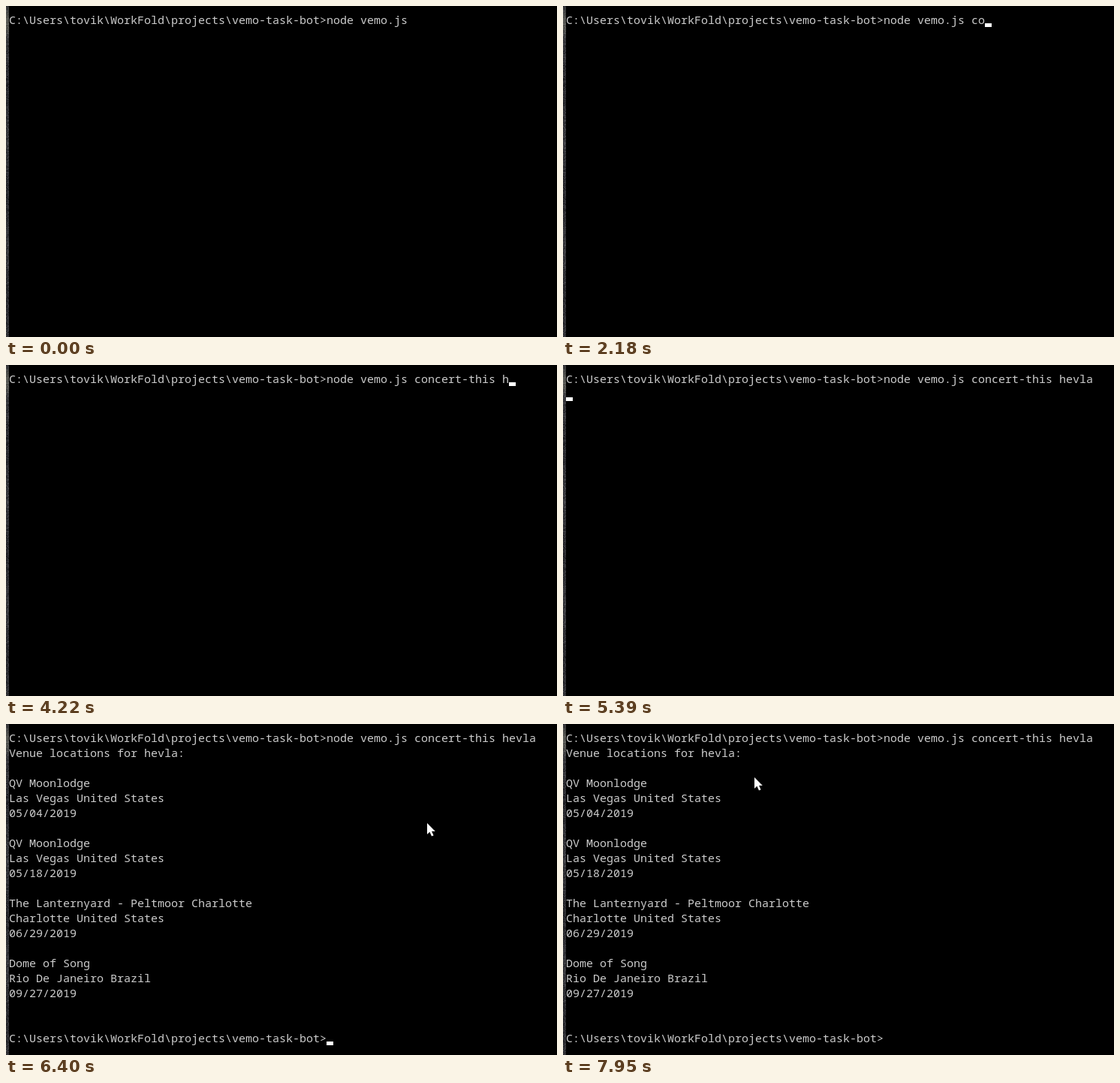
Write an HTML page with a canvas that moves like this. It is 734 px wide and 441 px high and loops after 8 s.

```html
<!DOCTYPE html>
<html lang="en">
<head>
<meta charset="utf-8">
<title>Terminal session</title>
<style>
  html, body { margin: 0; width: 100%; height: 100%; overflow: hidden; background: #000; }
  #stage { position: relative; width: 734px; height: 441px; overflow: hidden; contain: strict; }
  #stage > * { position: absolute; left: 0; top: 0; }
  #stage > #output {
    left: 4px; top: 8px; margin: 0; color: #ccc;
    font: 15px/20px "Noto Sans Mono", "DejaVu Sans Mono", monospace;
    font-variant-ligatures: none;
  }
  #caret { width: 9px; height: 5px; background: #fff; }
</style>
</head>
<body>
<div id="stage">
  <canvas id="strip" width="4" height="441"></canvas>
  <pre id="output"></pre>
  <div id="caret"></div>
  <svg id="mouse" width="12" height="19"><path d="M0 0V15L3.4 11.8L6 17.6L8.6 16.5L6.1 10.9H10.8Z" fill="#fff"/></svg>
</div>
<script>
const LOOP = 8000, ENTER = 5070, RESULT = 5790, DONE = 5940;
const BLINK_START = 1160, BLINK = 530;
const prompt = 'C:\\Users\\tovik\\WorkFold\\projects\\vemo-task-bot>';
const command = prompt + 'node vemo.js ';
const result = `
Venue locations for hevla:

QV Moonlodge
Las Vegas United States
05/04/2019

QV Moonlodge
Las Vegas United States
05/18/2019

The Lanternyard - Peltmoor Charlotte
Charlotte United States
06/29/2019

Dome of Song
Rio De Janeiro Brazil
09/27/2019


`;

// Typing bursts: start, time per key, text
const bursts = [[2030, 141, 'concert'], [3200, 90, '-this'], [3750, 470, ' h'], [4370, 106, 'evla']];
const keys = bursts.flatMap(([start, gap, text]) =>
  [...text].map((char, i) => ({ char, time: start + i * gap })));
const events = [BLINK_START, ...keys.map(k => k.time), ENTER, RESULT, DONE];

const el = id => document.getElementById(id);
const output = el('output'), caret = el('caret'), mouse = el('mouse');
const place = (node, x, y) => node.style.transform = `translate(${Math.round(x)}px, ${Math.round(y)}px)`;
const show = (node, on) => node.style.display = on ? 'block' : 'none';
const mix = (a, b, p) => a + (b - a) * p;

// Progress from 0 to 1 in equal jumps, as a screen recorder sees it
function steps(t, start, count) {
  const n = Math.floor((t - start) / 76) + 1;
  return Math.min(Math.max(n / count, 0), 1);
}

function drawStrip() {
  const ctx = el('strip').getContext('2d');
  let seed = 7;
  const random = () => (seed = seed * 16807 % 2147483647) / 2147483647;
  for (let y = 0; y < 441; y++) {
    const glow = y < 42 ? 35 * Math.sin(y / 42 * Math.PI) : 0;
    for (let x = 0; x < 4; x++) {
      const v = 28 + 42 * random() + 8 * Math.sin(y / 23) + glow;
      ctx.fillStyle = `rgb(${v}, ${v}, ${v + 4 - glow / 4})`;
      ctx.fillRect(x, y, 1, 1);
    }
  }
}

// Every event shows the caret; a steady timer toggles it
function caretOn(t) {
  if (t < BLINK_START) return false;
  const tick = time => Math.floor((time - BLINK_START) / BLINK);
  const last = Math.max(...events.filter(e => e <= t));
  return (tick(t) - tick(last)) % 2 === 0;
}

function drawMouse(t) {
  const peek = t >= 230 && t < 300;
  show(mouse, peek || t >= DONE);
  if (peek) return place(mouse, 679, 438);
  const left = 1 - steps(t, 6400, 9), drift = steps(t, 7720, 4);
  const x = mix(261, 668, left ** 2.6), y = mix(56, 230, left ** 7);
  place(mouse, mix(x, 255, drift), mix(y, 71, drift));
}

function render(t) {
  const typed = keys.filter(k => k.time <= t).map(k => k.char).join('');
  let text = command + typed, col = text.length, row = 0;
  if (t >= ENTER) { col = 0; row = 1; }
  if (t >= RESULT) { text += result; row = 19; }
  if (t >= DONE) { text += prompt; col = prompt.length; row = 20; }
  if (output.textContent !== text) output.textContent = text;

  place(caret, 4 + 9 * col, 23 + 20 * row);
  show(caret, caretOn(t));
  drawMouse(t);
}

drawStrip();
const start = performance.now();
function tick() {
  render((performance.now() - start) % LOOP);
  requestAnimationFrame(tick);
}
tick();
</script>
</body>
</html>
```
